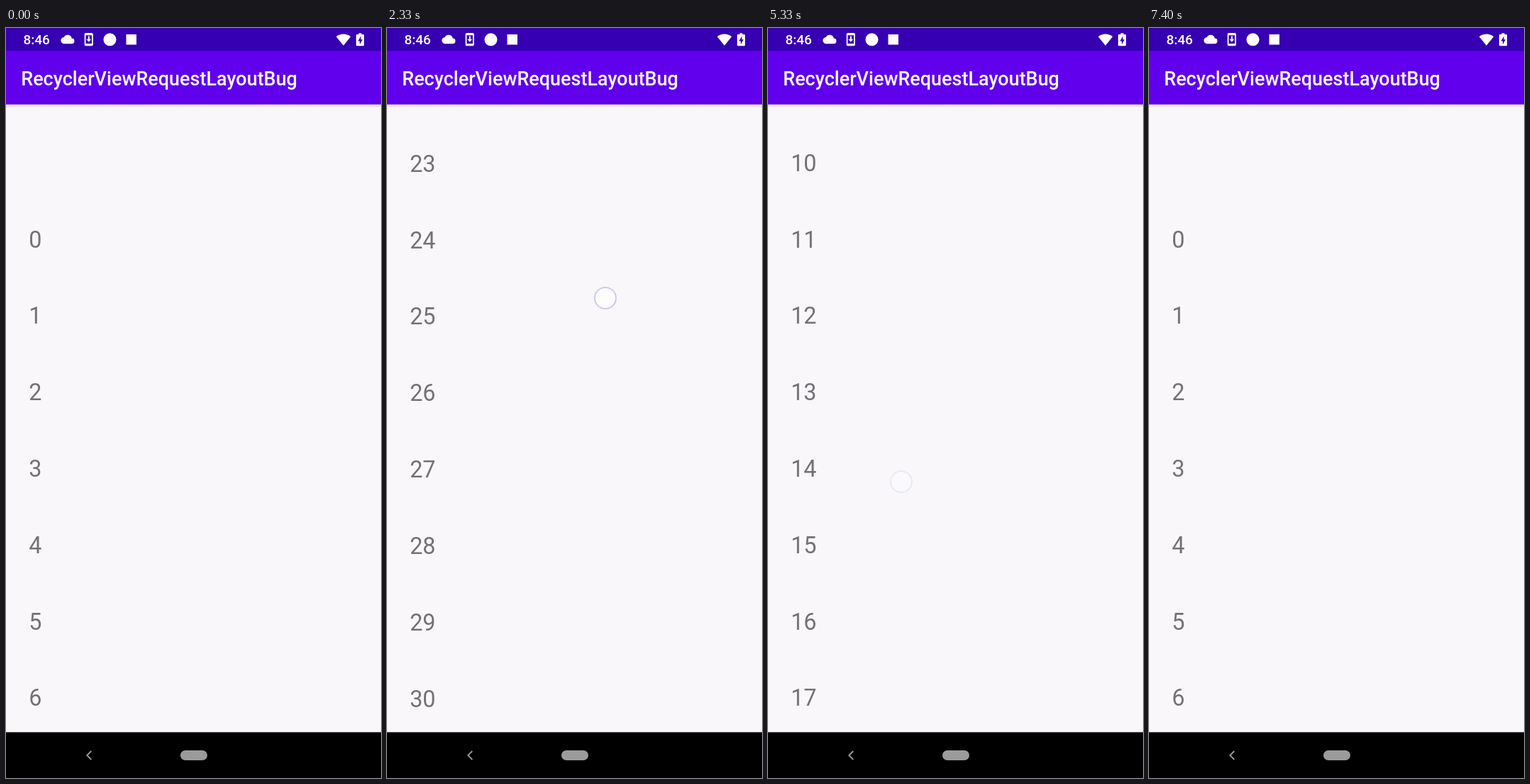
An HTML page for the animation above (7.47 s loop, 529 by 1058 pixels).

```html
<!DOCTYPE html>
<html lang="en">
<head>
<meta charset="utf-8">
<title>List scrolling</title>
<style>
html, body { margin: 0; width: 100%; height: 100%; overflow: hidden; background: #000; }
svg { display: block; width: 529px; height: 1058px; font-family: Roboto, sans-serif; }
</style>
</head>
<body>
<svg viewBox="0 0 529 1058">
  <defs>
    <clipPath id="area"><path d="M0 107H529V993.4H0z"/></clipPath>
    <linearGradient id="shade" x2="0" y2="1">
      <stop stop-color="#000" stop-opacity=".13"/>
      <stop offset="1" stop-color="#000" stop-opacity="0"/>
    </linearGradient>
  </defs>
  <rect width="529" height="1058" fill="#000"/>
  <rect y="107" width="529" height="886.4" fill="#f9f7fa"/>
  <g id="rows" clip-path="url(#area)" fill="#727175" font-size="32.35"></g>
  <rect y="107.8" width="529" height="5" fill="url(#shade)"/>
  <rect width="529" height="107.8" fill="#6000ec"/>
  <rect width="529" height="32.3" fill="#3600b2"/>
  <g fill="#fff">
    <text x="21.3" y="80.9" font-size="26.96" font-weight="500">RecyclerViewRequestLayoutBug</text>
    <text x="24.4" y="23.3" font-size="19" font-weight="500">8:46</text>
    <path transform="translate(77.600 6.700) scale(.78)" d="M19.350 10A7.500 7.500 0 0 0 5.350 8A6 6 0 0 0 6 20H19A5 5 0 0 0 19.350 10z"/>
    <path fill-rule="evenodd" d="M112.500 7H121a1.800 1.800 0 0 1 1.800 1.800V23.500a1.800 1.800 0 0 1-1.800 1.800H112.500a1.800 1.800 0 0 1-1.800-1.800V8.800A1.800 1.800 0 0 1 112.500 7zM112.500 10.200V22H121V10.200z"/>
    <path d="M115.800 11.500h2v4.200h2.400l-3.400 4l-3.400-4h2.400z"/>
    <circle cx="146.500" cy="16.300" r="9"/>
    <rect x="169.500" y="9" width="14.500" height="14.500"/>
    <path d="M465.800 12.200a16 16 0 0 1 20.400 0L476 24.800z"/>
    <path d="M497.500 7.200h4v1.900h2.400q1.200 0 1.200 1.200V24q0 1.200-1.200 1.200h-8.800q-1.200 0-1.200-1.200V10.300q0-1.200 1.200-1.200h2.400z"/>
    <path d="M500.600 11.500l-4.100 7h2.500v4.700l4-7h-2.400z" fill="#3600b2"/>
  </g>
  <path d="M120.300 1020L114.300 1026L120.300 1032" fill="none" stroke="#9c9c9c" stroke-width="1.800"/>
  <rect x="246" y="1019" width="38" height="14" rx="7" fill="#9b9b9b"/>
  <circle id="touch" r="15" fill="#fff" fill-opacity=".75" stroke="#cfc9e9" stroke-width="2"/>
</svg>
<script>
const LOOP = 7470, TICK = 1000 / 15, ROW = 107.83;
const LAST = 30, TOP = 24;           // last item; rows scrolled at the very bottom
const FLING = 25, FLING_TICKS = 11;
const SLOW = 4, QUICK = 6;           // pulls back down, in two paces

const rowsBox = document.getElementById("rows");
const touch = document.getElementById("touch");
const mix = (a, b, p) => a + (b - a) * p;
const clamp = v => Math.max(0, Math.min(1, v));

// Two flicks send the list to its end.
const flicks = [
  { down: FLING, rest: 28, gone: 30, from: [261, 575], to: [291, 302] },
  { down: 31, rest: 34, gone: 38, from: [262, 600], to: [308, 381] }
];

// Each pull brings it back by whole rows: two at first, then evenly to zero.
function rowsAfter(n) {
  return n <= SLOW ? TOP - 2 * n : Math.ceil((TOP - 2 * SLOW) * (1 - (n - SLOW) / QUICK));
}

const pulls = Array.from({ length: SLOW + QUICK }, (_, i) => {
  const slow = i < SLOW;
  const down = Math.round(slow ? 40 + 7.6 * i : 69 + 6.2 * (i - SLOW));
  const hold = i === SLOW + QUICK - 1 ? 5 : 0;   // the finger lingers at the end
  return {
    down,
    rest: down + (slow ? 2 : 3),
    gone: down + (slow ? 4 : 6) + hold,
    from: [275 - 4 * i, 420 - 2 * i],
    to: [173 + 3 * i, 540 + 20 * i],
    rows: [rowsAfter(i), rowsAfter(i + 1)]
  };
});

const strokes = [...flicks, ...pulls];
const progress = (s, k) => clamp((k - s.down) / (s.rest - s.down));

const labels = Array.from({ length: 10 }, () => {
  const el = document.createElementNS("http://www.w3.org/2000/svg", "text");
  el.setAttribute("x", 32.2);
  rowsBox.append(el);
  return el;
});

function scrollAt(k) {
  const pull = pulls.filter(s => k >= s.down).pop();
  if (pull) {
    const [a, b] = pull.rows;
    return (a - Math.floor((a - b) * progress(pull, k))) * ROW;
  }
  const p = clamp((k - FLING) / FLING_TICKS);
  return TOP * ROW * (1 - (1 - p ** 2.5) ** 5);
}

function drawTouch(k) {
  const s = strokes.filter(s => k >= s.down && k < s.gone).pop();
  touch.setAttribute("opacity", s ? clamp((s.gone - k) / Math.min(3, s.gone - s.rest)) : 0);
  if (!s) return;
  const p = progress(s, k);
  touch.setAttribute("cx", mix(s.from[0], s.to[0], p));
  touch.setAttribute("cy", mix(s.from[1], s.to[1], p));
}

function draw(ms) {
  const k = Math.floor((ms % LOOP + 5) / TICK);
  const scroll = scrollAt(k);
  const first = Math.max(0, Math.floor(scroll / ROW) - 2);
  labels.forEach((el, i) => {
    const n = first + i;
    el.textContent = n > LAST ? "" : n;
    el.setAttribute("y", (309.5 + n * ROW - scroll).toFixed(2));
  });
  drawTouch(k);
}

let start;
function loop(now) {
  start ??= now;
  draw(now - start);
  requestAnimationFrame(loop);
}
draw(0);
requestAnimationFrame(loop);
</script>
</body>
</html>
```
